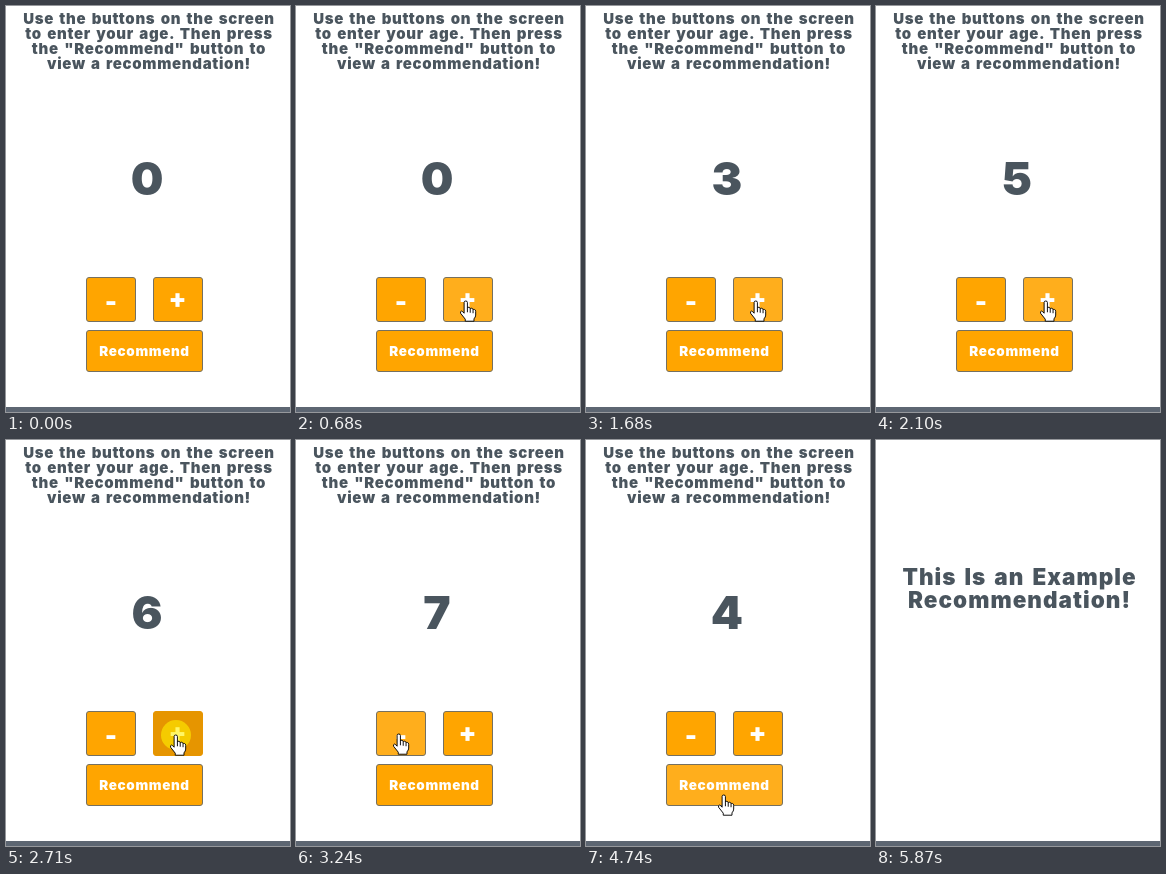
Write an HTML page that moves like this. It is 284 by 406 pixels and loops after 6070 ms.

```html
<!DOCTYPE html>
<html lang="en">
<head>
<meta charset="utf-8">
<title>Age recommendation</title>
<style>
  html, body { margin: 0; width: 100%; height: 100%; overflow: hidden; background: #fff; }
  svg { display: block; }
  text {
    font: 900 15px Inter, sans-serif;
    letter-spacing: .046em;
    word-spacing: .11em;
    text-anchor: middle;
    fill: #4a555e;
  }
  .button rect { fill: #ffa500; stroke: #757060; }
  .button.hover rect { fill: #ffae1c; }
  .button.active rect { fill: #e69500; stroke: #e69500; }
  .button text { fill: #fff; font-size: 13.5px; }
  .button .sign { font-size: 26px; letter-spacing: 0; }
  #age { font-size: 46px; letter-spacing: 0; }
  #result text { font-size: 22.5px; }
  #cursor path { fill: #fff; stroke: #000; stroke-linejoin: round; }
</style>
</head>
<body>
<svg width="284" height="406" viewBox="0 0 284 406">
  <g id="form">
    <text x="143" y="18">Use the buttons on the screen</text>
    <text x="143" y="33">to enter your age. Then press</text>
    <text x="143" y="48">the "Recommend" button to</text>
    <text x="143" y="63">view a recommendation!</text>
    <text id="age" x="141" y="189">0</text>
    <g class="button">
      <rect x="80.5" y="271.5" width="49" height="44" rx="2.5"/>
      <text class="sign" x="105" y="304.5">-</text>
    </g>
    <g class="button">
      <rect x="147.5" y="271.5" width="49" height="44" rx="2.5"/>
      <text class="sign" x="171.5" y="302">+</text>
    </g>
    <g class="button">
      <rect x="80.5" y="324.5" width="116" height="41" rx="2.5"/>
      <text x="138.5" y="350">Recommend</text>
    </g>
  </g>
  <g id="result">
    <text x="143.5" y="145">This Is an Example</text>
    <text x="143.5" y="168">Recommendation!</text>
  </g>
  <rect y="401" width="284" height="5" fill="#5d6672"/>
  <g id="cursor">
    <circle id="glow" r="15" fill="#fff000" fill-opacity=".6"/>
    <g id="hand" transform="scale(.94)">
      <path d="M-2 1.5Q-2 0 -.3 0Q1.5 0 1.5 1.5V7.5Q1.8 6.5 3 6.7Q4.5 7 4.5 8.3Q5 7.4 6.2 7.7Q7.5 8 7.5 9.4Q8 8.6 9 9Q10.3 9.4 10.3 11V15Q10.3 17 8.5 19V21.5H-.8V19.3L-5.8 13Q-6.3 11 -4.8 10.7Q-3.5 11 -2 13Z"/>
      <path d="M1.5 7.5V12M4.5 8.5V12.5M7.5 9.5V13"/>
    </g>
    <path id="arrow" d="M0 0V16.5L3.8 13L6.3 18.8L8.8 17.7L6.4 12H11.7Z"/>
  </g>
</svg>
<script>
const LOOP = 6070, FRAME = 70, SUBMIT = 4940, LEAVE = 5600;
const $ = id => document.getElementById(id);

// Each glide starts where the previous one ended.
const glides = [
  { start: 0, end: 1, x: 296, y: 268 },
  { start: 260, end: 680, x: 170, y: 295 },
  { start: 2980, end: 3240, x: 103, y: 294 },
  { start: 3310, end: 3380, x: 109, y: 286 },
  { start: 4390, end: 4740, x: 138, y: 355 },
  { start: LEAVE, end: 5870, x: 296, y: 402 }
];

// Evenly spaced clicks, counted when the mouse button is released.
const clicks = (first, period, count) => t =>
  Math.max(0, Math.min(count, Math.floor((t - first) / period) + 1));
const added = clicks(820, 320, 7);
const removed = clicks(3450, 305, 3);
const submits = clicks(SUBMIT, LOOP, 1);
const released = t => added(t) + removed(t) + submits(t);

const buttons = [...document.querySelectorAll('.button')].map(node => {
  const { x, y, width, height } = node.querySelector('rect').getBBox();
  const contains = (px, py) => px >= x && px <= x + width && py >= y && py <= y + height;
  return { node, contains };
});

const ease = p => (1 - Math.cos(Math.PI * p)) / 2;
const show = (id, visible) => $(id).setAttribute('visibility', visible ? 'visible' : 'hidden');

function cursorAt(t) {
  const index = glides.filter(g => g.start <= t).length - 1;
  const to = glides[index], from = glides[index - 1] || to;
  const elapsed = (Math.floor((t - to.start) / FRAME) + 1) * FRAME;
  const p = ease(Math.min(1, elapsed / (to.end - to.start)));
  const mix = axis => Math.round(from[axis] + (to[axis] - from[axis]) * p);
  return [mix('x'), mix('y')];
}

function draw(t) {
  const [x, y] = cursorAt(t);
  const submitted = t >= SUBMIT;
  const pressed = released(t + FRAME) > released(t);
  let overButton = false;

  for (const { node, contains } of buttons) {
    const hover = !submitted && contains(x, y);
    overButton ||= hover;
    node.classList.toggle('hover', hover);
    node.classList.toggle('active', hover && pressed);
  }

  $('age').textContent = added(t) - removed(t);
  $('cursor').setAttribute('transform', `translate(${x} ${y})`);

  const hand = overButton || (submitted && t < LEAVE);
  show('form', !submitted);
  show('result', submitted);
  show('hand', hand);
  show('arrow', !hand);
  show('glow', pressed);
}

function tick() {
  draw(performance.now() % LOOP);
  requestAnimationFrame(tick);
}
tick();
</script>
</body>
</html>
```
